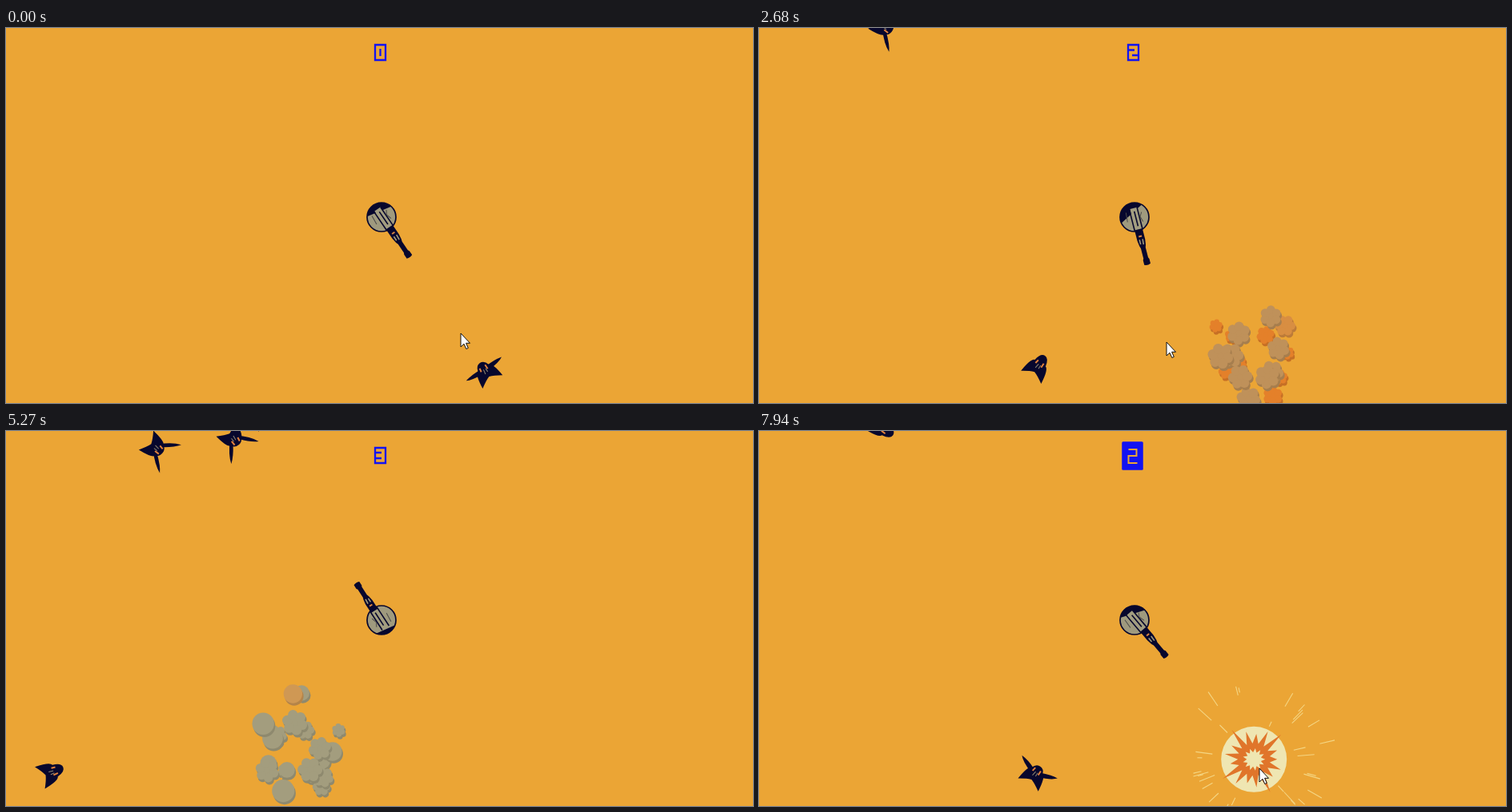
Animation, 933 px wide and 468 px high, one loop 8000 ms. Source, as an HTML page:

```html
<!DOCTYPE html>
<html lang="en">
<head>
<meta charset="utf-8">
<title>Turret game</title>
<style>
html, body { margin: 0; width: 100%; height: 100%; overflow: hidden; background: #eba535; }
svg { display: block; width: 100%; height: 100%; }
</style>
</head>
<body>
<svg id="stage" viewBox="0 0 933 468" preserveAspectRatio="none"></svg>
<script>
const stage = document.getElementById('stage');
const LOOP = 8000, STEPS = 114, TURN = 73;
const BG = '#eba535', NAVY = '#07072d', CREAM = '#efe6b2', BLUE = '#1212f2';
const HUB = [469, 236], RAD = Math.PI / 180;
const ORANGE = [228, 128, 42], TAN = [207, 152, 84], GREY = [163, 157, 126];

const clamp = (v, a = 0, b = 1) => Math.min(b, Math.max(a, v));
const mix = (a, b, t) => a + (b - a) * t;
const n1 = v => v.toFixed(1);
const rng = seed => () => (seed = (seed * 16807) % 2147483647) / 2147483647;
const polar = (r, a) => [r * Math.cos(a), r * Math.sin(a)];
const blend = (c, d, t, light = 1) => `rgb(${c.map((v, i) => Math.round(mix(v, d[i], t) * light))})`;
const circle = (x, y, r, fill, more = '') =>
  `<circle cx="${n1(x)}" cy="${n1(y)}" r="${n1(Math.max(0, r))}" fill="${fill}" ${more}/>`;
const path = (d, fill, more = '') => `<path d="${d}" fill="${fill}" ${more}/>`;
const line = (d, color, width) => path(d, 'none', `stroke="${color}" stroke-width="${width}"`);
const group = (x, y, deg, body) =>
  `<g transform="translate(${n1(x)} ${n1(y)}) rotate(${n1(deg)})">${body}</g>`;

function ray(r, a, len, color) {
  const [x, y] = polar(r, a), [dx, dy] = polar(len, a);
  return line(`M${n1(x)} ${n1(y)}l${n1(dx)} ${n1(dy)}`, color, 1.1);
}

// Pointer keys: step, x, y
const POINTER = [[0, 568, 381], [24, 631, 430], [34, 625, 421], [38, 509, 392],
  [43, 365, 390], [60, 364, 395], [66, 150, 230], [73, 325, -65]];

// Enemies fly at the hub: place x, y at step k, entry step, step of the hit,
// a step with folded wings and the wing period
const ENEMIES = [
  { k: 0, x: 600, y: 430, speed: 2.1, enter: -30, hit: 10, fold: -3 },
  { k: 24, x: 627, y: 420, speed: 1.5, enter: 12, hit: 33, fold: 26 },
  { k: 57, x: 363, y: 400, speed: 1.5, enter: 26, hit: 58, fold: 37, period: 10 },
  { k: 57, x: 173, y: 10, speed: 1.1, enter: 0, fold: 33 },
  { k: 72, x: 283, y: 8, speed: 1.1, enter: 40, fold: 56.5 },
  { k: 72, x: 55, y: 427, speed: 2.7, enter: 49, fold: 72.5 },
  { k: 72, x: 323, y: -31, speed: 1.1, enter: 60, fold: 66.4 }
];

function headingOf(e) {
  return Math.atan2(HUB[1] - e.y, HUB[0] - e.x);
}

function placeOf(e, k) {
  const rush = Math.min(300, 60 * Math.exp((e.enter - 2 - k) / 2.5));
  const [dx, dy] = polar((k - e.k) * e.speed - rush, headingOf(e));
  return [e.x + dx, e.y + dy];
}

const BLASTS = ENEMIES.filter(e => e.hit).map(e => {
  const [x, y] = placeOf(e, e.hit);
  return { k: e.hit, x, y };
});

function pointerAt(k) {
  const i = Math.max(1, POINTER.findIndex(p => p[0] >= k));
  const [a, b] = [POINTER[i - 1], POINTER[i]];
  const t = (k - a[0]) / (b[0] - a[0]);
  return [mix(a[1], b[1], t), mix(a[2], b[2], t)];
}

function aimAt(x, y) {
  const deg = Math.atan2(y - HUB[1], x - HUB[0]) / RAD;
  return deg < -90 ? deg + 360 : deg;
}

function enemy(e, k) {
  if (k >= e.hit) return '';
  const [x, y] = placeOf(e, k);
  const phase = (k - e.fold) / (e.period || 11.2);
  const s = clamp(.5 - .8 * Math.cos(2 * Math.PI * phase));
  const head = n1(18 - 6 * s);
  const [tx, ty] = polar(mix(19, 33, s), mix(130, 42, s) * RAD);
  const inSmoke = BLASTS.some(b => k - b.k > 8 && k - b.k < 18 && Math.hypot(x - b.x, y - b.y) < 60);
  const fill = inSmoke ? blend(GREY, GREY, 0) : NAVY;
  const edge = inSmoke ? `stroke="${NAVY}" stroke-width="1.6"` : '';
  const arm = m => {
    const [ax, ay] = [mix(4, tx, .6), mix(7, ty, .6)];
    return path(`M1 ${5 * m}Q${n1(ax - 3)} ${n1((ay + 2) * m)} ${n1(tx)} ${n1(ty * m)}` +
      `Q${n1(ax + 3)} ${n1((ay - 2) * m)} 7 ${5 * m}z`, fill, edge);
  };
  const wing = m => `Q6 ${13 * m} -14 ${15 * m}`;
  let body = arm(-1) + arm(1) +
    path(`M${head} 0Q${head} -6 7 -8${wing(-1)}Q-8 -6 -6 0Q-8 6 -14 15Q6 13 7 8Q${head} 6 ${head} 0z`, fill, edge);
  if (!inSmoke) body += line('M4 -5l5 1M3 4l6 0', '#e2813c', 2) + line('M-1 -2l6 1M0 2l5 0', '#8d8873', 1);
  return group(x, y, headingOf(e) / RAD, body);
}

function puff(x, y, r, turn, round, fill) {
  if (round) return circle(x, y, r, fill);
  let out = circle(x, y, r * .62, fill);
  for (let i = 0; i < 6; i++) {
    const [dx, dy] = polar(r * .62, turn + i * Math.PI / 3);
    out += circle(x + dx, y + dy, r * .4, fill);
  }
  return out;
}

function smoke(age, rand) {
  const spread = 1 - Math.exp(-age / 3);
  const size = Math.min(1, .5 + .1 * age) * clamp(1 - (age - 14) / 9);
  const puffs = Array.from({ length: 20 }, (_, i) => {
    const far = 24 + 52 * rand();
    const [x, y] = polar(far, i * 2.4 + rand());
    return { x, y, r: 8 + 8 * rand(), turn: 3 * rand(), pale: far > 58 && rand() < .6, odd: i % 2 };
  }).sort((a, b) => a.r - b.r);
  const body = puffs.map(p => {
    const x = p.x * spread, y = p.y * spread, r = p.r * size;
    const t = clamp((age - (p.r > 12.5 ? 1 : 5)) / 7), end = p.pale ? TAN : GREY;
    const round = age > 9 && (p.pale || p.odd);
    return puff(x + 1.5, y + 3, r, p.turn, round, blend(ORANGE, end, t, .87)) +
      puff(x, y, r, p.turn, round, blend(ORANGE, end, t));
  }).join('');
  return `<g opacity="${clamp((23 - age) / 8)}">${body}</g>`;
}

function star(spikes, inner, reach, fill) {
  let d = '';
  for (let i = 0; i < spikes * 2; i++) {
    const [x, y] = polar(i % 2 ? inner : reach(i / 2), i * Math.PI / spikes);
    d += (i ? 'L' : 'M') + n1(x) + ' ' + n1(y);
  }
  return path(d + 'z', fill);
}

function flash(age, rand) {
  const grow = 1 - .25 * Math.abs(age - 1);
  const reach = i => (i % 4 === 3 ? 46 : 29 + (i * 7) % 11) * grow;
  let out = '';
  for (let i = 0; i < 34; i++) {
    out += ray((44 + rand() * 42) * (.7 + .3 * age), rand() * 2 * Math.PI, 6 + rand() * 17, '#f4d684');
  }
  if (age < 2) out += circle(0, 0, 41 * grow, CREAM);
  return out + star(17, 20 * grow, reach, '#e0752a') + star(13, 9 * grow, () => 14 * grow, CREAM);
}

function blast(b, k) {
  const age = k - b.k;
  if (age < 0 || age > 22) return '';
  const rand = rng(b.k * 977 + 31);
  const body = (age > 1 ? smoke(age, rand) : '') + (age < 3 ? flash(age, rand) : '');
  return group(b.x, b.y, 0, body);
}

function shot(b, k, aim) {
  if (k !== b.k - 1) return '';
  const [dx, dy] = polar(62, aim * RAD);
  const x = HUB[0] + dx, y = HUB[1] + dy, rand = rng(b.k + 5);
  let out = '';
  for (let i = 0; i < 10; i++) {
    const t = .1 + i * .073;
    out += circle(mix(x, b.x, t), mix(y, b.y, t), 4.8 - i * .36, '#efcd70', 'stroke="#cf9337" stroke-width=".8"');
  }
  let rays = '';
  for (let i = 0; i < 6; i++) rays += ray(14 + 16 * rand(), (rand() - .5) * 4, 4 + 8 * rand(), '#f3c866');
  return out + group(x, y, aim, rays);
}

function turret(aim) {
  const foreshort = 1 - .05 * (1 - Math.sin(aim * RAD));
  const off = 1 + Math.abs(aim - 121) * .1;
  const half = n1(Math.sqrt(Math.max(1, 324 - off * off)));
  const cap = path(`M${n1(off)} -${half}A18 18 0 0 1 ${n1(off)} ${half}z`, NAVY);
  const stripes = path('M-11 -6H17V3H-11z', '#a29d80') +
    line('M-11 -6H17M-11 4H17M-7 -1.5H12', NAVY, 1.6) +
    line('M-8 9l12 1M-4 -10l5 3l7 -2', '#4b4a4a', 1);
  const barrel = `<g transform="translate(0 -1) scale(${foreshort.toFixed(3)} 1)">` +
    path('M16 -5L30 -5L37 -4L40 -3L53 -3L55 -4H61Q63 0 61 4H55L53 3L40 3L37 4L30 5H16z', NAVY) +
    line('M29 -2L36 -1.5M29 2L35 2', '#a09a7c', 1.6) + line('M25 -2v4', '#d98543', 2) + '</g>';
  return circle(...HUB, 18, '#9f9a7e') +
    group(...HUB, 250 - (aim - 53), cap) +
    group(...HUB, aim, stripes + barrel) +
    circle(...HUB, 18, 'none', `stroke="${NAVY}" stroke-width="1.7"`);
}

const BOX = 'M461 21h13v19h-13z';
const DIGITS = [BOX + 'M467.5 26v9', 'M461 21h9.5v14h3.5v5.5h-13v-5.5h4v-7.5h-4z',
  BOX + 'M461 27.5h8M474 34h-8', BOX + 'M461 27h8M461 34h8'];
const THIN = ['M-5 -8h10v17h-10z', 'M-4 -8h5v17m-5 0h10', 'M-5 -8h10v8h-10v9h11', 'M-5 -8h10v17h-10m0 -9h10'];

function score(k) {
  const hits = BLASTS.filter(b => k >= b.k);
  const n = hits.length, age = n ? k - hits[n - 1].k : 99;
  if (age > 2) return line(DIGITS[n], BLUE, 2.3);
  const w = 13 + 27 / 2 ** age, h = w + 9;
  return `<rect x="${466.5 - w / 2}" y="${31 - h / 2}" width="${w}" height="${h}" rx="1.5" fill="${BLUE}"/>` +
    `<g transform="translate(466.5 31) scale(${n1(w / 27)})">${line(THIN[n], BG, 2)}</g>`;
}

function draw(ms) {
  const step = Math.floor(ms % LOOP / LOOP * STEPS);
  const k = step > TURN ? 2 * TURN + 1 - step : step;
  const [px, py] = pointerAt(k), aim = aimAt(px, py);
  const arrow = path('M0 0V17L4 13.3L6.8 19.5L9.3 18.4L6.6 12.3H11.5z', '#fff',
    'stroke="#111" stroke-width="1" stroke-linejoin="round"');
  stage.innerHTML = `<rect width="933" height="468" fill="${BG}"/>` +
    BLASTS.map(b => blast(b, k)).join('') +
    ENEMIES.map(e => enemy(e, k)).join('') +
    BLASTS.map(b => shot(b, k, aim)).join('') +
    turret(aim) + score(k) + group(px, py, 0, arrow);
}

const start = performance.now();
function tick() {
  draw(performance.now() - start);
  requestAnimationFrame(tick);
}
tick();
</script>
</body>
</html>
```
